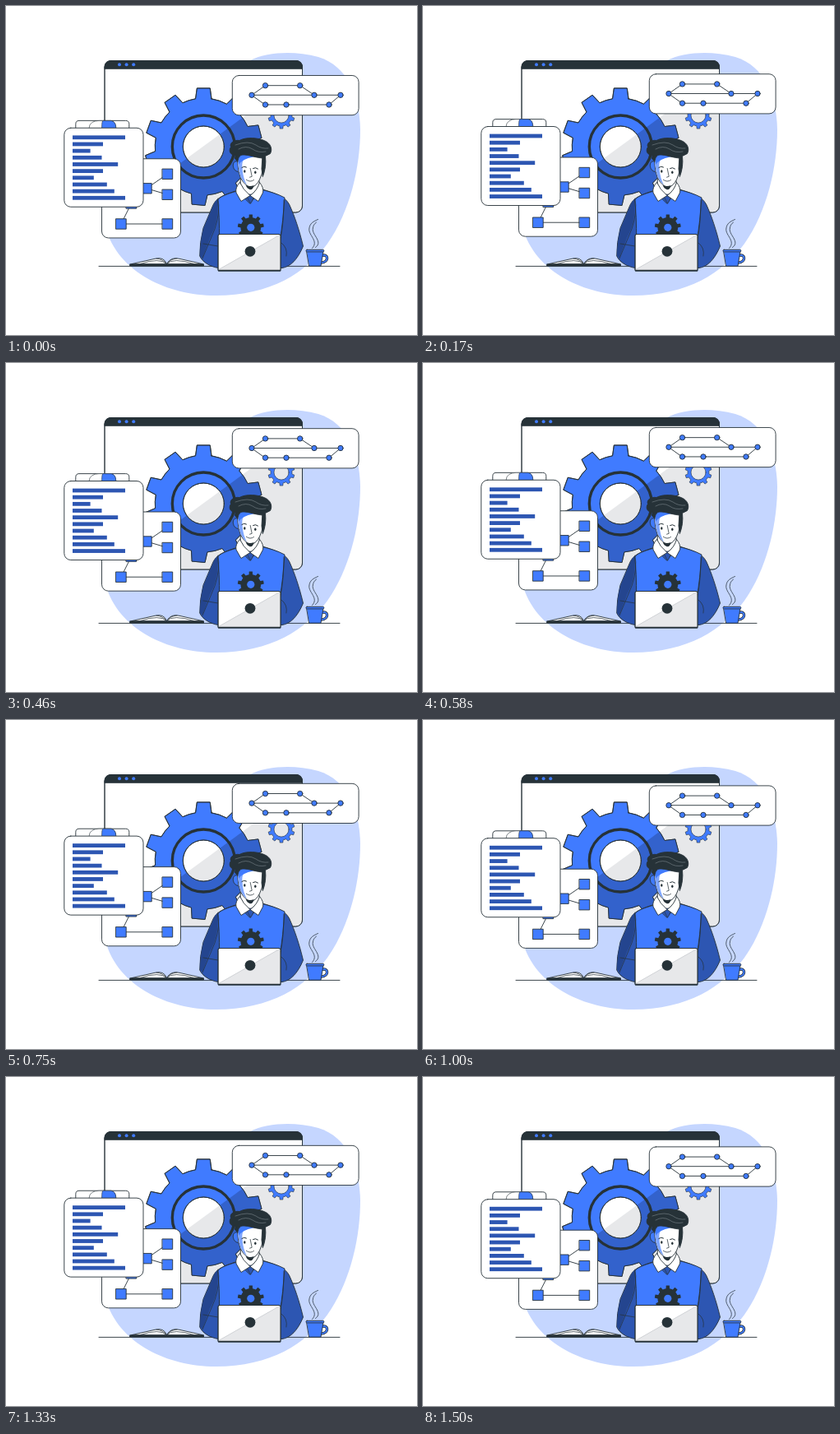
Animation of 500 by 400 pixels, one loop 1.54 s. Source, as an HTML page:

```html
<!DOCTYPE html>
<html lang="en">
<head>
<meta charset="utf-8">
<title>Developer at work</title>
<style>
html, body { margin: 0; width: 100%; height: 100%; overflow: hidden; background: #fff; }
svg { display: block; width: 100vw; height: 100vh; }
.ln { fill: none; }
.w { fill: #fff; }
.b { fill: #407bff; }
.mid { fill: #3362cc; }
.deep { fill: #2d56b2; }
.ink { fill: #263238; }
.grey { fill: #e7e8ea; }
.flat { stroke: none; }
</style>
</head>
<body>
<svg viewBox="0 0 500 400" stroke="#263238" stroke-width=".9" stroke-linejoin="round" stroke-linecap="round">
  <defs>
    <clipPath id="half"><path d="M130 251L360 83V251Z"/></clipPath>
  </defs>

  <path class="flat" fill="#c5d6ff" d="M123 275C139 323 195 352 255 352C322 352 365 324 391 289C419 249 431 195 431 150C430 108 415 73 380 62C350 54 318 56 297 66L240 120Z"/>

  <!-- browser window -->
  <rect class="w" x="120" y="66.5" width="240.5" height="184.5" rx="8"/>
  <path class="grey flat" d="M130 250.6L360.1 83V243Q360.1 250.6 352 250.6Z"/>
  <path class="ink" d="M120 76V74.5Q120 66.5 128 66.5H352.5Q360.5 66.5 360.5 74.5V76Z"/>
  <g class="b flat"><circle cx="138" cy="71.3" r="2"/><circle cx="146.6" cy="71.3" r="2"/><circle cx="155.2" cy="71.3" r="2"/></g>
  <rect class="ln" x="120" y="66.5" width="240.5" height="184.5" rx="8"/>

  <g id="gears"></g>
  <circle class="ln" cx="240.3" cy="171" r="38" stroke-width="3.4"/>
  <circle class="w" cx="240.3" cy="171" r="25"/>
  <circle class="grey flat" cx="240.3" cy="171" r="24.5" clip-path="url(#half)"/>
  <circle class="ln" cx="240.3" cy="171" r="25"/>

  <!-- desk, book -->
  <path class="ln" d="M113 316.4H406"/>
  <path class="ink" d="M151 313.8H240.5V316H151Z"/>
  <path class="w" d="M153 313.6L181 307.3Q192 304.5 195.5 313.6Q201 304.5 211 307.3L239 313.6Z"/>
  <path class="ln" d="M164 313.4Q187 305.5 195.5 313.6Q203 305.5 228 313.4M183 307Q191 308 195.5 313.6Q199 308 208 307" stroke-width=".7"/>

  <!-- cup -->
  <path class="ln" d="M384.5 303.5C392 300.5 393.5 311.5 383.5 312" stroke-width="3.4"/>
  <path class="ln" d="M384.5 303.5C392 300.5 393.5 311.5 383.5 312" stroke="#407bff" stroke-width="1.9"/>
  <path class="b" d="M366 298.5H386L383 316.2H369Z"/>
  <rect class="b" x="365" y="296.3" width="21.8" height="2.6" rx="1.2"/>
  <path class="ln" d="M372.5 294.5C381 286 368 279 368.8 271C369.5 264 374 262 379.5 259.5M376.5 293.5C386 287 373 279 373.2 271.5C373.4 267 375 265 377.5 263" stroke-width=".75"/>

  <!-- torso and arms -->
  <path class="deep" d="M282 224C264 230 256 233 251.5 243L240 270Q235.5 288 235.7 304C240 313 250 317 258 318.5H336C346 317 355 308 361.5 292C357 273 351 255 344.5 241C339 231 328 228 309 222Z"/>
  <path class="flat" fill="#24458f" d="M257.5 240Q259 262 248 282L239 306.5L236.2 303.5Q236 286 240.5 270.2L252 243.5Q254 237 258 234.5Z"/>
  <path class="b" d="M281 225C267 229 260 232 257.5 236Q260 254 259.5 285H333.5Q337 262 339 233C331 228.5 320 225.5 310 223L297 240Z"/>
  <path class="ln" d="M258 234Q261 250 254 271L239 307M338 236Q338 264 334 282M240 289L258 292M335 288Q343 294 341 304" stroke-width=".7"/>
  <g id="badge"></g>

  <!-- neck, collar -->
  <path class="w" d="M285.5 207L285 220L297 232L309 219L307 208Z"/>
  <path class="deep" d="M292 229H303L300 236L297.8 240Z" stroke-width=".6"/>
  <path class="w" d="M284.5 214.5Q278.5 221 280 227L286 237.5L297 230.5Q288 223 284.5 214.5Z"/>
  <path class="w" d="M308.5 214.5Q314 221 312.5 227L307 237.5L297 230.5Q306 224 308.5 214.5Z"/>

  <!-- head -->
  <path class="b" d="M282 189C276 187 274.5 195 278.5 199.5Q281 202.5 284 201Z"/>
  <path class="w" d="M281.5 181Q281 205 288.5 214Q294 220.5 299 220.3Q304.5 219 308.5 211Q314.5 199 314 178Z"/>
  <path class="flat" fill="#7fa6ff" d="M282 183Q281.5 204 288.8 213.6L293 217.6Q288.5 209 287.8 200Q286.5 190 289 187L304 180H283Z"/>
  <path class="b flat" d="M282 181L283 193Q287 186 301 183.5L309 178Z"/>
  <path class="ink flat" d="M291.5 217.8Q296.5 220.3 301.7 218Q300.5 223.5 297 223.2Q293.5 222.5 291.5 217.8Z"/>
  <path class="ink" d="M281.8 189L278.5 185.5L279 181.5C272 181 270.8 175.5 273.5 171.5C271.5 166 278 162.5 284 163.5C292 159 307 160 315 164C322 167 324.5 174 321.5 179.5L315.5 182.5Q317 196 312.3 207.5L311 198L311.8 185C301 184 292 179.5 285.5 181.5Q282.3 184 281.8 189Z"/>
  <path class="ln" d="M279 169Q295 163 304 169Q311 174 319 173M283 174Q292 169 300 174Q307 179 316 177" stroke="#8a949b" stroke-width=".5"/>
  <path class="ln" d="M286.8 196.5Q289.5 194 292.5 196M300.5 197.5Q303.5 195.5 306.5 198" stroke-width="1"/>
  <g class="ink flat"><ellipse cx="290.3" cy="201" rx="1.2" ry="1.8"/><ellipse cx="303.3" cy="202.2" rx="1.2" ry="1.8"/></g>
  <path class="ln" d="M297.2 197.5L299.2 207.3L296.5 208.2M292.3 211.2Q297 215 301.5 211.5" stroke-width=".75"/>

  <!-- laptop -->
  <path class="w" d="M258 321V279.5Q258 277.5 260 277.5H332Q334 277.5 334 279.5V321Z"/>
  <path class="grey flat" d="M258.5 320.5L333.5 278V320.5Z"/>
  <path class="ln" d="M258.5 320.5L333.5 278" stroke="#aeb3b8" stroke-width=".5"/>
  <path class="ln" d="M258 321V279.5Q258 277.5 260 277.5H332Q334 277.5 334 279.5V321"/>
  <path class="ln" d="M258.8 321.7H333.4" stroke-width="2"/>
  <circle class="ink flat" cx="297" cy="298.3" r="6.4"/>

  <!-- floating panels, placed at their highest position -->
  <g id="float">
    <rect class="w" x="116.5" y="178.3" width="96" height="96.2" rx="8"/>
    <g id="tree"></g>
    <path class="w" d="M84.8 142V136Q84.8 131.9 89 131.9H145.5Q149.8 131.9 149.8 136V142Z"/>
    <path class="w" d="M101 141Q101 136 105 134Q108 131.9 113 131.9H128Q133.8 133 133.8 141Z" stroke-width=".6"/>
    <path class="b" d="M116.5 141Q116.5 132 118 131.9H128Q133.8 133 133.8 141Z" stroke-width=".6"/>
    <rect class="w" x="70.8" y="140.8" width="96.2" height="96" rx="8"/>
    <g id="bars" class="deep flat"></g>
    <rect class="w" x="275.3" y="77" width="153.8" height="48.2" rx="8"/>
    <g id="graph"></g>
  </g>
</svg>
<script>
const LOOP = 1540, TOP = 721, RISE = 8;
const el = id => document.getElementById(id);

function gear(cx, cy, outer, inner, angles, wideOut, wideIn) {
  const at = (r, a) => {
    const t = a * Math.PI / 180;
    return (cx + r * Math.cos(t)).toFixed(2) + ' ' + (cy - r * Math.sin(t)).toFixed(2);
  };
  return angles.map((a, i) =>
    (i ? `A${inner} ${inner} 0 0 0 ` : 'M') + at(inner, a - wideIn) +
    'L' + at(outer, a - wideOut) + 'L' + at(outer, a + wideOut) + 'L' + at(inner, a + wideIn)
  ).join('') + `A${inner} ${inner} 0 0 0 ${at(inner, angles[0] - wideIn)}Z`;
}
const ring = (n, from) => Array.from({ length: n }, (_, i) => from + i * 360 / n);

const big = gear(240.3, 171, 71.5, 59, [90, 125, 160, 195, 230, 265, 302, 338, 375, 412], 6.4, 9.5);
const small = gear(335, 133, 16.2, 13, ring(10, 90), 6.5, 9.5);
const hole = 'M344 133A9 9 0 1 0 326 133A9 9 0 1 0 344 133Z';
el('gears').innerHTML =
  `<path class="b" d="${big}"/><path class="mid flat" clip-path="url(#half)" d="${big}"/><path class="ln" d="${big}"/>` +
  `<path class="b" fill-rule="evenodd" stroke-width=".6" d="${small}${hole}"/>`;
el('badge').innerHTML =
  `<path class="ink flat" d="${gear(297.8, 269.3, 16, 12.3, ring(9, 90), 7.5, 10.5)}"/><circle class="b flat" cx="297.8" cy="269.3" r="4.6"/>`;

el('bars').innerHTML = [145, 118, 102.6, 116.5, 136.2, 118, 106.8, 122.8, 131.8, 145]
  .map((x, i) => `<rect x="81" y="${149.9 + i * 8.17}" width="${x - 81}" height="4.8"/>`).join('');

const squares = [[196.5, 196.8], [196.5, 221.8], [171, 214.3], [152.5, 232.5], [140, 257.5], [196.5, 257.5]];
el('tree').innerHTML =
  '<path class="ln" d="M196.5 196.8L171 214.3L196.5 221.8M171 214.3L152.5 232.5L140 257.5H196.5"/>' +
  squares.map(([x, y]) => `<rect class="b" x="${x - 6.2}" y="${y - 6.2}" width="12.4" height="12.4"/>`).join('');

const dots = [[315.5, 89.2], [357.7, 89.2], [299, 100.8], [375, 100.8], [407, 100.8], [315.5, 112.5], [341, 112.5], [393, 112.5]];
el('graph').innerHTML =
  '<path class="ln" d="M299 100.8L315.5 89.2H357.7L375 100.8M299 100.8H407L393 112.5H315.5Z"/>' +
  dots.map(([x, y]) => `<circle class="b" cx="${x}" cy="${y}" r="3.2"/>`).join('');

const float = el('float');
function draw(ms) {
  const t = ms % LOOP;
  const gap = Math.abs(t - TOP);
  const drop = RISE * Math.min(gap, LOOP - gap) / (LOOP / 2);
  float.setAttribute('transform', `translate(0 ${drop.toFixed(3)})`);
}

const start = performance.now();
function tick() {
  draw(performance.now() - start);
  requestAnimationFrame(tick);
}
tick();
</script>
</body>
</html>
```
